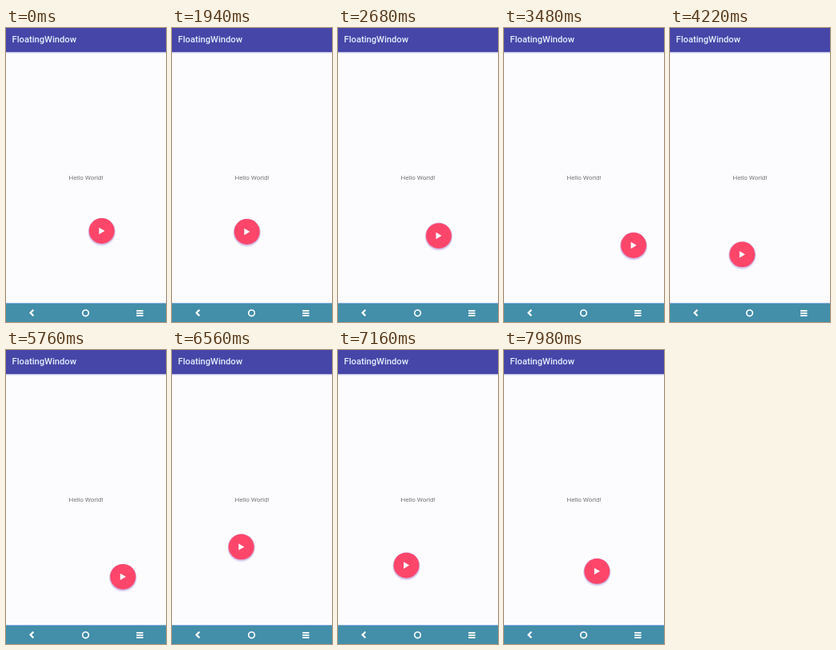
Animation of 200 by 368 pixels, one loop 8 s. Source, as an HTML page with a canvas:

```html
<!DOCTYPE html>
<html lang="en">
<head>
<meta charset="utf-8">
<title>Floating button</title>
<style>
  html, body { margin: 0; width: 100%; height: 100%; overflow: hidden; background: #fcfcff; }
  canvas { display: block; width: 200px; height: 368px; }
</style>
</head>
<body>
<canvas id="stage"></canvas>
<script>
const W = 200, H = 368, LOOP = 8000;
const canvas = document.getElementById('stage');
const ctx = canvas.getContext('2d');
const dpr = window.devicePixelRatio || 1;
canvas.width = W * dpr;
canvas.height = H * dpr;

// Where the drag turns or rests
const drag = [
  { t: 0, x: 119.7, y: 254 },
  { t: 760, x: 93.7, y: 255 },
  { t: 1940, x: 93.7, y: 255 },
  { t: 3480, x: 162, y: 272 },
  { t: 4080, x: 101, y: 290 },
  { t: 4700, x: 66, y: 240 },
  { t: 5800, x: 146.5, y: 284 },
  { t: 6450, x: 82, y: 240 },
  { t: 6900, x: 112.5, y: 282 },
  { t: 7450, x: 54, y: 255 },
  { t: LOOP, x: 116.5, y: 277 }
];

// Slope at a key, flat at turning points so the path never overshoots
function slope(i, axis) {
  const a = drag[i - 1], b = drag[i], c = drag[i + 1];
  if (!a || !c) return 0;
  const before = (b[axis] - a[axis]) / (b.t - a.t);
  const after = (c[axis] - b[axis]) / (c.t - b.t);
  return before * after <= 0 ? 0 : 2 * before * after / (before + after);
}

function along(t, axis) {
  const i = drag.findIndex(key => key.t > t) - 1;
  const a = drag[i], b = drag[i + 1], span = b.t - a.t;
  const u = (t - a.t) / span, v = 1 - u;
  return v * v * (1 + 2 * u) * a[axis] + u * u * (3 - 2 * u) * b[axis]
    + span * u * v * (v * slope(i, axis) - u * slope(i + 1, axis));
}

function rect(y, h, color) {
  ctx.fillStyle = color;
  ctx.fillRect(0, y, W, h);
}

function disc(x, y, r, color) {
  ctx.fillStyle = color;
  ctx.beginPath();
  ctx.arc(x, y, r, 0, 2 * Math.PI);
  ctx.fill();
}

function text(str, x, y, font, color, align) {
  ctx.font = font + ' Roboto, sans-serif';
  ctx.fillStyle = color;
  ctx.textAlign = align;
  ctx.fillText(str, x, y);
}

function line(points, width) {
  ctx.lineWidth = width;
  ctx.beginPath();
  points.forEach(([x, y]) => ctx.lineTo(x, y));
  ctx.stroke();
}

function drawScreen() {
  rect(0, H, '#fcfcff');
  rect(0, 30, '#4646a8');
  rect(30, 1, '#c4c4ea');
  rect(31, 1, '#e6e6f6');
  text('FloatingWindow', 7.5, 18, '500 11.2px', '#e4eefa', 'left');
  text('Hello World!', 100, 190, '8px', '#747478', 'center');
}

function drawNav() {
  rect(344, 1, '#8aaeea');
  rect(345, 23, '#438ea9');
  ctx.strokeStyle = '#fff';
  line([[34.3, 352.7], [30.6, 356.5], [34.3, 360.3]], 2.3);
  ctx.lineWidth = 1.7;
  ctx.beginPath();
  ctx.arc(99.5, 356.8, 3.8, 0, 2 * Math.PI);
  ctx.stroke();
  for (let i = 0; i < 3; i++) line([[163, 354 + 3 * i], [171.5, 354 + 3 * i]], 1.8);
}

function drawButton(x, y) {
  disc(x, y + 1.6, 17.2, '#e4e0f0');
  disc(x, y + 0.5, 16.7, '#d3b4e4');
  disc(x, y, 15.9, '#fd466a');
  ctx.fillStyle = '#fff';
  ctx.beginPath();
  ctx.moveTo(x - 3.4, y - 4.2);
  ctx.lineTo(x + 3.7, y);
  ctx.lineTo(x - 3.4, y + 4.2);
  ctx.fill();
}

const start = performance.now();
function frame() {
  const t = (performance.now() - start) % LOOP;
  ctx.setTransform(dpr, 0, 0, dpr, 0, 0);
  drawScreen();
  drawNav();
  drawButton(along(t, 'x'), along(t, 'y'));
  requestAnimationFrame(frame);
}
frame();
</script>
</body>
</html>
```
